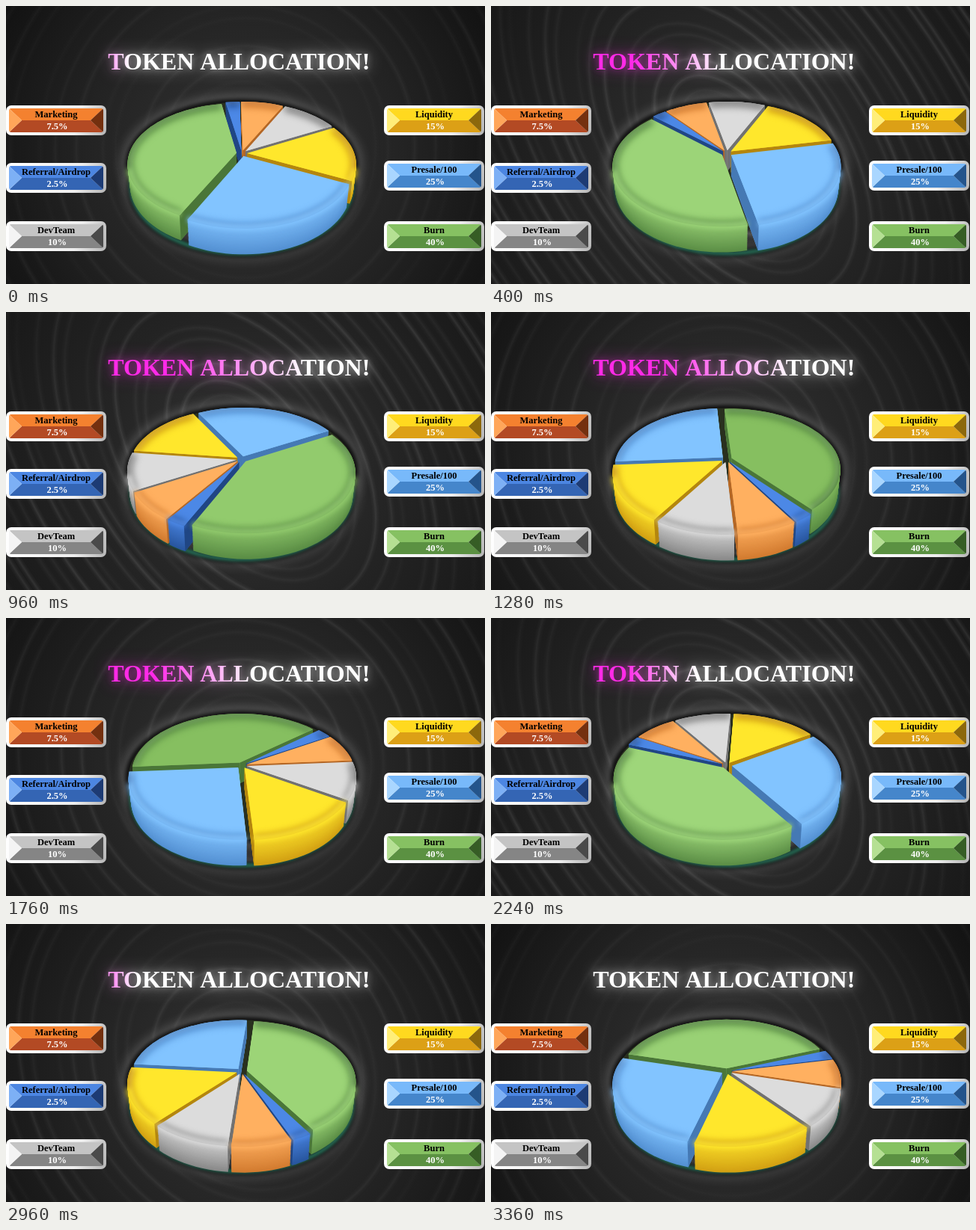
An HTML page with a canvas that plays this animation: 640x372 px, repeating every 3.44 s.

```html
<!DOCTYPE html>
<html lang="en">
<head>
<meta charset="utf-8">
<title>Token allocation</title>
<style>
html, body { margin: 0; width: 100%; height: 100%; overflow: hidden; background: #111; }
canvas { display: block; }
</style>
</head>
<body>
<canvas id="stage" width="640" height="372"></canvas>
<script>
const ctx = document.getElementById('stage').getContext('2d');
const W = 640, H = 372, LOOP = 3440, STEP = 80, RAD = Math.PI / 180;
const SERIF = '"Liberation Serif", "Times New Roman", serif';
const DEPTH = 28, RADIUS = 0.955, GAP = 0.047;

// Values over the loop, all on the same key times
const TIMES = [0, 640, 1280, 1760, 2240, 2560, 3360];
const SPIN = [-1, -81, -211, -301, -420, -482, -642];
const SQUASH = [1, 0.3, 0.93, 0.95, 0.64, 0.72, 1];
const RIPPLE = [0.035, 0.12, 0.055, 0.06, 0.08, 0.075, 0.035];
const PINK = [166, 395, 405, 330, 275, 218, 130];
const PALE = [0.8, 1, 0, 0, 1, 1, 0.8];

const SLICES = [
  { part: 7.5, top: [255, 176, 96], side: [205, 117, 42] },
  { part: 10, top: [220, 220, 220], side: [128, 128, 128] },
  { part: 15, top: [255, 231, 44], side: [205, 152, 16] },
  { part: 25, top: [130, 196, 255], side: [78, 138, 205] },
  { part: 40, top: [158, 214, 122], side: [84, 134, 64] },
  { part: 2.5, top: [76, 136, 230], side: [36, 80, 150] }
];

// x, y, name, share, then top, left, bottom and right bevel colours
const LABELS = [
  [0, 133, 'Marketing', '7.5%', '#f4812f', '#ffa65a', '#b34a24', '#74300f'],
  [0, 210, 'Referral/Airdrop', '2.5%', '#4c86e2', '#7db0f5', '#3465b4', '#1d3b74'],
  [0, 288, 'DevTeam', '10%', '#c4c4c4', '#f4f4f4', '#858585', '#4a4a4a'],
  [505, 133, 'Liquidity', '15%', '#ffd91f', '#ffee79', '#dca016', '#8c680c'],
  [505, 207, 'Presale/100', '25%', '#78b9fa', '#a9d6ff', '#4586cb', '#24548b'],
  [505, 288, 'Burn', '40%', '#86c162', '#b5e093', '#5b9142', '#365d25']
];

const mix = (a, b, k) => a + (b - a) * k;
const rgb = (a, b = a, k = 0) => `rgb(${a.map((v, i) => Math.round(mix(v, b[i], k)))})`;

function at(values, t, ease = 1) {
  let i = 0;
  while (i < TIMES.length - 1 && t >= TIMES[i + 1]) i++;
  if (i === TIMES.length - 1) return values[i];
  const k = (t - TIMES[i]) / (TIMES[i + 1] - TIMES[i]);
  return mix(values[i], values[i + 1], i ? k : k ** ease);
}

// Perspective view of a point on the disc, sunk by h
function project(x, y, h = 0) {
  const w = 1 + 0.188 * y;
  return [315 + 150 * x * (1 - h * 0.0008) / w, 197 + (h - 82 * y) / w];
}

function poly(points) {
  ctx.beginPath();
  points.forEach(p => ctx.lineTo(p[0], p[1]));
  ctx.closePath();
}

function arc(from, to, r, h = 0, dx = 0, dy = 0) {
  const n = Math.max(4, Math.ceil((to - from) / 3)), out = [];
  for (let i = 0; i <= n; i++) {
    const a = mix(from, to, i / n) * RAD;
    out.push(project(dx + r * Math.sin(a), dy + r * Math.cos(a), h));
  }
  return out;
}

function line(points, color, width, blur = 0) {
  ctx.save();
  if (blur) ctx.filter = `blur(${blur}px)`;
  ctx.beginPath();
  points.forEach(p => ctx.lineTo(p[0], p[1]));
  ctx.strokeStyle = color;
  ctx.lineWidth = width;
  ctx.stroke();
  ctx.restore();
}

function background(t) {
  const ripple = at(RIPPLE, t), s = at(SQUASH, t), lift = Math.round(ripple * 120);
  const glow = ctx.createRadialGradient(320, 205, 40, 320, 205, 390);
  glow.addColorStop(0, rgb([48, 48, 48]));
  glow.addColorStop(0.5, rgb([35, 35, 35]));
  glow.addColorStop(1, rgb([13 + lift, 13 + lift, 13 + lift]));
  ctx.fillStyle = glow;
  ctx.fillRect(0, 0, W, H);
  // Ripples fade towards the ends of the tilt axis
  const shine = a => {
    const g = ctx.createLinearGradient(120, -50, 520, 430);
    [s * 0.7, 1, 1, s * 0.7].forEach((k, i) => {
      g.addColorStop(i / 3, `rgba(255,255,255,${a * k})`);
    });
    return g;
  };
  for (let i = 2; i < 44; i++) {
    const r = i * 28 + 6 * Math.sin(i * 2.4);
    const a = ripple * (0.65 + 0.35 * Math.sin(i * 1.7));
    for (const [width, k] of [[9, 0.3], [5, 0.4], [2, 0.5]]) {
      ctx.beginPath();
      ctx.ellipse(320, 190, r, r * s, 54 * RAD, 0, 7);
      ctx.strokeStyle = shine(a * k);
      ctx.lineWidth = width;
      ctx.stroke();
    }
  }
}

function slice(s, pale) {
  const { from, to, mid } = s, ex = GAP * Math.sin(mid * RAD), ey = GAP * Math.cos(mid * RAD);
  const shape = h => [project(ex, ey, h), ...arc(from, to, RADIUS, h, ex, ey)];
  const top = s.part === 40 ? s.top.map((v, i) => mix([134, 191, 96][i], v, pale)) : s.top;
  for (let h = DEPTH; h > 0; h--) {
    poly(shape(h));
    ctx.fillStyle = rgb(top, s.side, 0.2 + 0.7 * h / DEPTH);
    ctx.fill();
  }
  // Cut walls that face the viewer
  const wall = a => {
    const x = ex + RADIUS * Math.sin(a * RAD), y = ey + RADIUS * Math.cos(a * RAD);
    poly([project(ex, ey), project(x, y), project(x, y, DEPTH), project(ex, ey, DEPTH)]);
    ctx.fillStyle = rgb(s.side.map(v => v * 0.88));
    ctx.fill();
  };
  if (Math.sin(to * RAD) > 0) wall(to);
  if (Math.sin(from * RAD) < 0) wall(from);

  const rim = arc(from, to, RADIUS, 0, ex, ey);
  poly(shape(0));
  ctx.fillStyle = rgb(top);
  ctx.fill();
  ctx.save();
  ctx.clip();
  line(rim, rgb(s.side), 14, 5);
  line(arc(from, to, 0.93, 0, ex, ey), 'rgba(255,255,255,0.14)', 4, 2);
  ctx.restore();
  const a = Math.max(from, 105), b = Math.min(to, 255);
  if (b > a) line(arc(a, b, RADIUS - 0.01, 0, ex, ey), rgb(top), 7, 3);
}

function pie(t) {
  const ring = arc(0, 360, 0.99), base = arc(92, 268, 0.99, DEPTH);
  line(ring, 'rgba(255,255,255,0.2)', 20, 7);
  line(base, 'rgba(255,255,255,0.16)', 18, 7);
  line(ring, 'rgba(0,0,0,0.8)', 9, 2.5);
  line(base, 'rgba(0,0,0,0.8)', 10, 3);
  line(base, '#2b8569', 4, 2);
  poly(ring);
  ctx.fillStyle = '#29301f';
  ctx.fill();

  let a = at(SPIN, t, 1.6);
  const holds = (s, angle) => (((angle - s.from) % 360) + 360) % 360 < s.to - s.from;
  const parts = SLICES.map(s => {
    const from = a, to = a += s.part * 3.6, mid = (from + to) / 2;
    const p = { ...s, from: ((from % 360) + 360) % 360 };
    p.to = p.from + to - from;
    p.mid = mid;
    p.near = holds(p, 0) ? 2 : holds(p, 180) ? -2 : Math.cos(mid * RAD);
    return p;
  });
  parts.sort((p, q) => q.near - p.near).forEach(p => slice(p, at(PALE, t)));
}

function label([x, y, name, share, top, left, bottom, right]) {
  const frame = ctx.createLinearGradient(x, y, x + 134, y + 40);
  frame.addColorStop(0, '#fff');
  frame.addColorStop(0.7, '#eee');
  frame.addColorStop(1, '#b4b4b4');
  ctx.beginPath();
  ctx.roundRect(x, y, 134, 40, 7);
  ctx.fillStyle = frame;
  ctx.fill();
  ctx.save();
  ctx.beginPath();
  ctx.roundRect(x + 4, y + 4, 126, 32, 3);
  ctx.clip();
  const l = x + 4, r = x + 130, u = y + 4, d = y + 36, m = y + 20, il = l + 17, ir = r - 17;
  const facets = [
    [top, [[l, u], [r, u], [ir, m], [il, m]]],
    [bottom, [[l, d], [r, d], [ir, m], [il, m]]],
    [left, [[l, u], [il, m], [l, d]]],
    [right, [[r, u], [ir, m], [r, d]]]
  ];
  for (const [color, points] of facets) {
    poly(points);
    ctx.fillStyle = color;
    ctx.fill();
  }
  ctx.restore();
  ctx.font = `bold 12.5px ${SERIF}`;
  ctx.textAlign = 'center';
  ctx.fillStyle = '#000';
  ctx.fillText(name, x + 67, y + 16);
  ctx.fillStyle = '#fff';
  ctx.fillText(share, x + 68.5, y + 31.5);
}

function title(t) {
  const reach = at(PINK, t), fill = ctx.createLinearGradient(130, 0, 490, 0);
  const end = (reach - 130) / 360, strength = Math.min(1, end * 4);
  const pink = rgb([255, 255, 255], [255, 42, 232], strength);
  fill.addColorStop(0, pink);
  fill.addColorStop(end * 0.35, pink);
  fill.addColorStop(end, '#fff');
  fill.addColorStop(1, '#fff');
  ctx.font = `bold 32px ${SERIF}`;
  ctx.textAlign = 'center';
  ctx.fillStyle = fill;
  for (const [blur, alpha] of [[11, 0.6], [5, 0.4], [0, 1]]) {
    ctx.save();
    if (blur) ctx.filter = `blur(${blur}px)`;
    ctx.globalAlpha = alpha;
    ctx.fillText('TOKEN ALLOCATION!', 311.3, 85);
    ctx.restore();
  }
}

let shown = -1;
function frame() {
  const t = Math.floor((performance.now() % LOOP) / STEP) * STEP;
  if (t !== shown) {
    shown = t;
    background(t);
    pie(t);
    LABELS.forEach(label);
    title(t);
  }
  requestAnimationFrame(frame);
}
frame();
</script>
</body>
</html>
```
